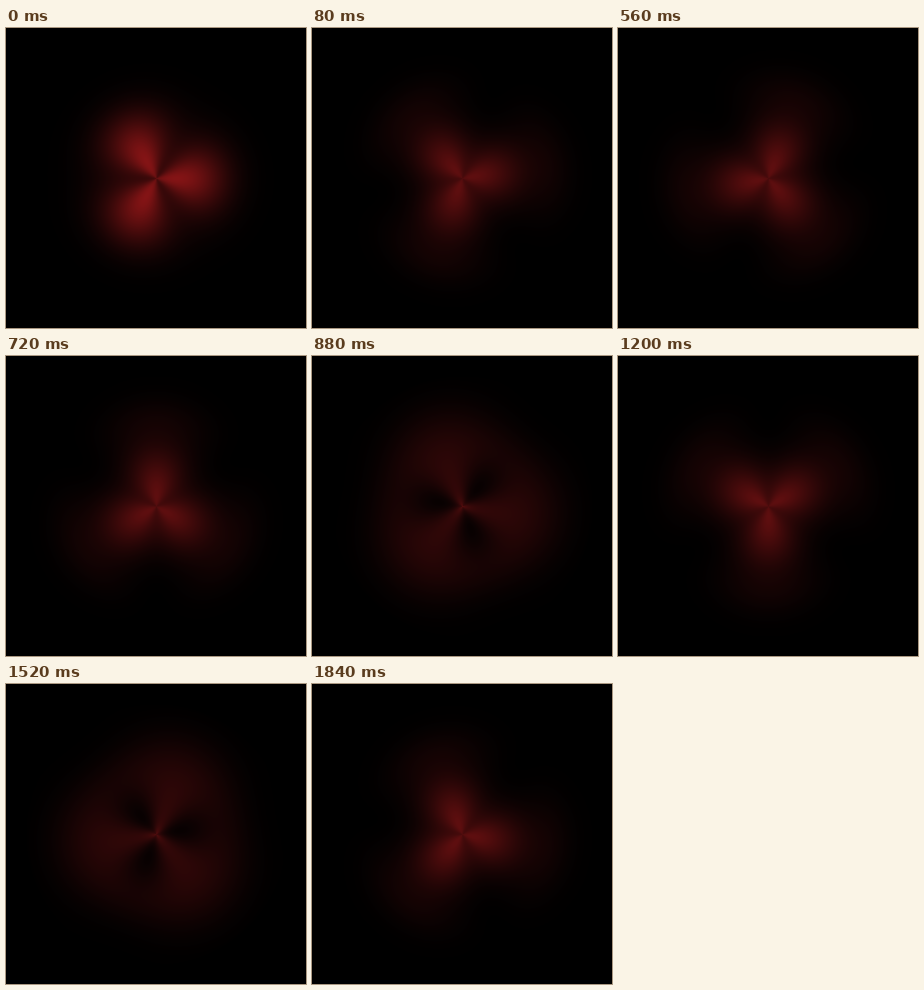
An HTML page with a canvas that plays this animation: 300x300 px, repeating every 1.92 s.

```html
<!DOCTYPE html>
<html lang="en">
<head>
<meta charset="utf-8">
<title>Rotating lobes</title>
<style>
  html, body { margin: 0; width: 100%; height: 100%; overflow: hidden; background: #000; }
  canvas { display: block; width: 300px; height: 300px; }
</style>
</head>
<body>
<canvas id="stage" width="300" height="300"></canvas>
<script>
const SIZE = 300, CENTER = 150.5, REACH = 130, FINE = 4;
const STEP_MS = 80, STEPS = 24, PULSE = 8, TURN = Math.PI / 18;

const disc = (r, width, power) => Math.exp(-((r / width) ** power));
const core = (r, width) => Math.exp(-r / width);
const ring = (r, mid, width) => Math.exp(-(((r - mid) / width) ** 2));

// Brightness by radius, along a lobe and along the gap between lobes.
const bright = {
  lobe: r => 140 * disc(r, 66, 3) - 45 * core(r, 9),
  gap: r => 56 * disc(r, 60, 2.6) + 24 * core(r, 4)
};
const tight = {
  lobe: r => 98 * disc(r, 58, 2.2) + 10 * ring(r, 88, 22) - 18 * core(r, 5),
  gap: r => 62 * disc(r, 42, 2.2) + 12 * core(r, 6)
};
const wide = {
  lobe: r => 47 * disc(r, 94, 4) + 38 * core(r, 6),
  gap: r => 23 * ring(r, 62, 30) + 66 * core(r, 8)
};

const clamp = x => Math.min(1, Math.max(0, x));
const ease = x => x * x * (3 - 2 * x);
const mix = (a, b, t) => a + (b - a) * t;

// Each pulse flashes, tightens, then spreads out and comes back.
function profile(part, step) {
  const k = step % PULSE;
  const away = Math.min(k, PULSE - k);
  const flash = clamp(1 - away);
  const spread = ease(clamp((away - 1) / 2));
  return Array.from({ length: REACH * FINE + 1 }, (_, i) => {
    const r = i / FINE;
    return mix(mix(tight[part](r), wide[part](r), spread), bright[part](r), flash);
  });
}

const ctx = document.getElementById('stage').getContext('2d');
const image = ctx.createImageData(SIZE, SIZE);
const radius = new Float32Array(SIZE * SIZE);
const angle = new Float32Array(SIZE * SIZE);
for (let i = 0; i < radius.length; i++) {
  const dx = i % SIZE + 0.5 - CENTER;
  const dy = Math.floor(i / SIZE) + 0.5 - CENTER;
  radius[i] = Math.hypot(dx, dy);
  angle[i] = Math.atan2(-dy, dx);
}

function draw(step) {
  const lobe = profile('lobe', step), gap = profile('gap', step);
  const data = image.data;
  for (let i = 0; i < radius.length; i++) {
    let v = 0;
    if (radius[i] < REACH) {
      const n = Math.round(radius[i] * FINE);
      const wave = 0.5 + 0.5 * Math.cos(3 * (angle[i] - step * TURN));
      v = mix(gap[n], lobe[n], wave);
    }
    const p = i * 4;
    data[p] = v;
    data[p + 1] = v * 0.15;
    data[p + 2] = v * 0.16;
    data[p + 3] = 255;
  }
  ctx.putImageData(image, 0, 0);
}

const start = performance.now();
let shown = 0;
draw(0);

function tick() {
  const step = Math.floor((performance.now() - start) / STEP_MS) % STEPS;
  if (step !== shown) draw(shown = step);
  requestAnimationFrame(tick);
}
requestAnimationFrame(tick);
</script>
</body>
</html>
```
